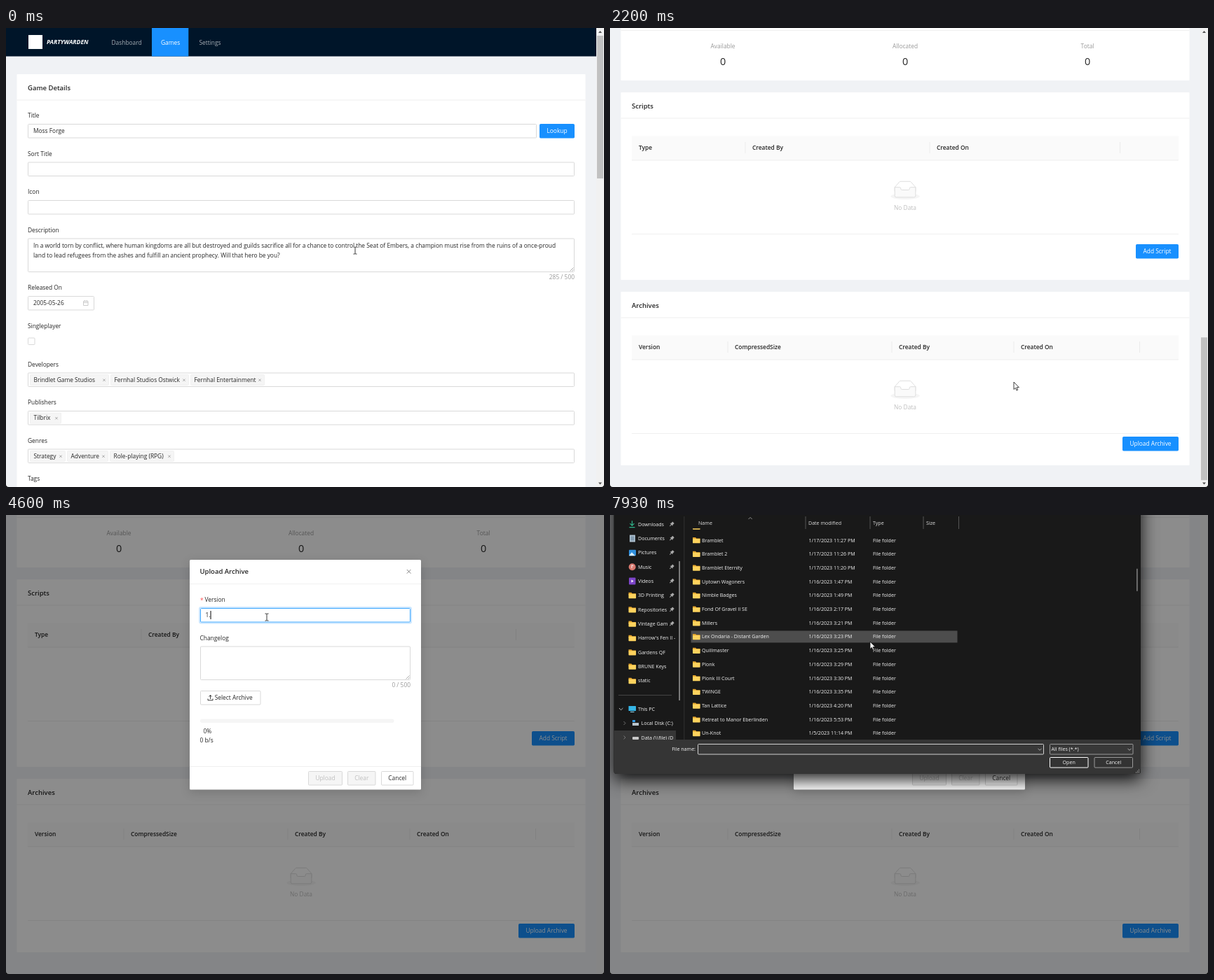
These frames come from a looping animation (853x656 px, 8000 ms). An HTML page:

```html
<!DOCTYPE html>
<html lang="en">
<head>
<meta charset="utf-8">
<title>Upload archive</title>
<style>
  html, body { margin: 0; width: 100%; height: 100%; overflow: hidden; background: #f0f2f5; }
  svg { display: block; width: 853px; height: 656px; }
  text { font-family: "Open Sans", "Noto Sans", sans-serif; white-space: pre; }
  #dialog { filter: drop-shadow(0 8px 12px rgba(0, 0, 0, .9)); }
  #modal { filter: drop-shadow(0 4px 7px rgba(0, 0, 0, .15)); }
</style>
</head>
<body>
<svg id="stage" viewBox="0 0 853 656" xmlns="http://www.w3.org/2000/svg"></svg>
<script>
const BLUE = '#1890ff', INK = '#262626', EDGE = '#d9d9d9', FAINT = '#f0f0f0', PALE = '#bfbfbf';
const LOOP = 8000, PAGE_END = 1388.5, ROW = 19.7, ROW0 = 31.7;

// Markup helpers: text is placed by its vertical centre.
const esc = s => s.replace(/&/g, '&amp;');
const text = (x, y, s, { size = 8.4, fill = INK, weight = 400, anchor = 'start', extra = '' } = {}) =>
  `<text x="${x}" y="${y + size * .36}" font-size="${size}" fill="${fill}" font-weight="${weight}" text-anchor="${anchor}" ${extra}>${esc(s)}</text>`;
const rect = (x, y, w, h, fill, extra = '') =>
  `<rect x="${x}" y="${y}" width="${w}" height="${h}" fill="${fill}" ${extra}/>`;
const line = (d, stroke, width = 1, extra = '') =>
  `<path d="${d}" fill="none" stroke="${stroke}" stroke-width="${width}" ${extra}/>`;
const box = (x, y, w, h, fill = '#fff', stroke = EDGE, extra = '') =>
  rect(x + .5, y + .5, w - 1, h - 1, fill, `stroke="${stroke}" rx="1" ${extra}`);
const bold = { weight: 600 };

function button(x, y, w, label, style = 'primary') {
  const [bg, edge, ink] = {
    primary: [BLUE, BLUE, '#fff'], plain: ['#fff', EDGE, INK], disabled: ['#f5f5f5', EDGE, PALE]
  }[style];
  return box(x, y, w, 20.5, bg, edge) + text(x + w / 2, y + 10.2, label, { fill: ink, anchor: 'middle' });
}

const grip = (x, y) => line(`M${x - 6} ${y - 1}l5-5M${x - 3} ${y - 1}l2-2`, '#888', .7);

function field(y, label, h = 20.5, w = 780) {
  return text(31, y, label) + box(31, y + 12, w, h);
}

function chip(x, y, w, label) {
  const cx = x + w - 7;
  return box(x, y + 14.5, w, 16, '#f5f5f5', FAINT) + text(x + 5.5, y + 22.3, label) +
    line(`M${cx - 1.7} ${y + 21}l3.4 3.4m0-3.4l-3.4 3.4`, '#8c8c8c', .7);
}

function card(y, bottom, title, head = 37) {
  return rect(15.5, y, 811, bottom - y, '#fff', 'rx="1"') +
    text(31, y + head / 2 + .7, title, { size: 9.5, weight: 600 }) +
    rect(15.5, y + head - .5, 811, 1, FAINT);
}

function emptyMark(y) {
  return `<g transform="translate(400.4 ${y}) scale(.645)"><ellipse cx="32" cy="33" rx="32" ry="7" fill="#f5f5f5"/>
    <g stroke="${EDGE}" stroke-width="1.3"><path fill="none" d="M55 12.8L44.9 1.3Q44 0 42.9 0H21.1Q20 0 19.1 1.3L9 12.8V22H55z"/>
    <path fill="#fafafa" d="M41.6 16Q41.6 13 44 13H55V31Q55 35 52 35H12Q9 35 9 31V13H20Q22.4 13 22.4 16T24.6 18.9H39.4Q41.6 18.9 41.6 16z"/></g></g>`;
}

function tableCard(y, bottom, title, columns, lastRule, label, buttonX, buttonY) {
  let out = card(y, bottom, title) + rect(31, y + 62.5, 780, 34.5, '#fafafa') + rect(31, y + 96.5, 780, 1, FAINT);
  columns.forEach(([x, name], i) => {
    out += text(x, y + 79, name, bold);
    if (i) out += rect(x - 10.5, y + 71, 1, 16, '#ebebeb');
  });
  return out + rect(lastRule, y + 71, 1, 16, '#ebebeb') + emptyMark(y + 127.3) +
    text(421, y + 164.6, 'No Data', { fill: PALE, anchor: 'middle' }) +
    rect(31, y + 202, 780, 1, FAINT) + button(buttonX, y + buttonY, 811 - buttonX, label);
}

function page() {
  const dim = '#999';
  let out = rect(0, 0, 842, 2046, '#f0f2f5') + rect(0, 0, 842, 40.5, '#001529') +
    rect(32, 10, 20, 20, '#fff') +
    text(58, 20, 'PARTYWARDEN', { size: 8.6, weight: 700, fill: '#fff', extra: 'font-style="italic"' }) +
    text(150.5, 20.5, 'Dashboard', { fill: '#a6adb4' }) + rect(208, 0, 52.3, 40.5, BLUE) +
    text(221, 20.5, 'Games', { fill: '#fff' }) + text(275.5, 20.5, 'Settings', { fill: '#a6adb4' });

  out += card(66, 764, 'Game Details') +
    field(125, 'Title', 20.5, 726) + text(39, 147, 'Moss Forge') + button(761, 137, 50, 'Lookup') +
    field(179.5, 'Sort Title') + field(234, 'Icon') + field(288.5, 'Description', 48.5) +
    text(39, 311, 'In a world torn by conflict, where human kingdoms are all but destroyed and guilds sacrifice all for a chance to control the Seat of Embers, a champion must rise from the ruins of a once-proud') +
    text(39, 325, 'land to lead refugees from the ashes and fulfill an ancient prophecy. Will that hero be you?') +
    grip(810.5, 348.5) + text(811, 356, '285 / 500', { fill: dim, anchor: 'end' }) +
    field(371, 'Released On', 20.5, 95) + text(39, 393.3, '2005-05-26') +
    line('M110.5 390.5h6.5v6h-6.5zM110.5 392.5h6.5M112.3 389v2M115.2 389v2', PALE, .8) +
    text(31, 426, 'Singleplayer') + box(31, 442.5, 10.5, 10.5) +
    field(480.5, 'Developers') + chip(34, 480.5, 113, 'Brindlet Game Studios') +
    chip(149, 480.5, 112, 'Fernhal Studios Ostwick') + chip(263, 480.5, 106, 'Fernhal Entertainment') +
    field(535, 'Publishers') + chip(34, 535, 45, 'Tilbrix') +
    field(589.5, 'Genres') + chip(34, 589.5, 51, 'Strategy') + chip(87, 589.5, 59, 'Adventure') +
    chip(148, 589.5, 92, 'Role-playing (RPG)') +
    field(644, 'Tags') + button(31, 713, 40, 'Save');

  out += tableCard(781, 1050, 'Actions',
    [[41, 'Name'], [161, 'Path'], [264, 'Arguments'], [439.5, 'Working Dir'], [626.5, 'Primary']], 755.5, 'Add Action', 747, 218);
  out += tableCard(1066.5, 1335, 'Multiplayer Modes',
    [[41, 'Type'], [161, 'MinPlayers'], [357, 'MaxPlayers'], [558, 'Description']], 748.5, 'Add Mode', 749, 217.5);
  out += card(1351.5, 1463.5, 'Keys', 40.5) + button(734, 1361.5, 37, 'Edit', 'plain') + button(771, 1361.5, 40, 'View');
  ['Available', 'Allocated', 'Total'].forEach((name, i) => {
    const x = 161 + 260 * i;
    out += text(x, 1414.5, name, { fill: dim, anchor: 'middle' }) + text(x, 1436.3, '0', { size: 14.4, anchor: 'middle' });
  });
  out += tableCard(1480.5, 1748.5, 'Scripts',
    [[41, 'Type'], [203, 'Created By'], [466, 'Created On']], 727, 'Add Script', 750, 217);
  out += tableCard(1765.5, 2013.5, 'Archives',
    [[41, 'Version'], [178, 'CompressedSize'], [412, 'Created By'], [586, 'Created On']], 755, 'Upload Archive', 731, 207);
  return out;
}

function modal() {
  return rect(262, 64, 330, 328.5, '#fff', 'rx="1.5"') +
    text(276.5, 81, 'Upload Archive', { size: 9.5, weight: 600 }) +
    line('M571.8 78l5.6 5.6m0-5.6l-5.6 5.6', '#777', .9) + rect(262, 98, 330, 1, FAINT) +
    text(277, 122, '*', { fill: '#ff4d4f' }) + text(283.5, 121, 'Version') +
    rect(276, 132, 302, 22.5, 'none', 'id="glow" rx="2" stroke="#1890ff" stroke-opacity=".22" stroke-width="2"') +
    box(277, 133, 300, 20.5, '#fff', EDGE, 'id="version"') +
    text(284.5, 143.2, '', { extra: 'id="typed"' }) + rect(284.5, 137, 1, 12, '#000', 'id="caret"') +
    text(276.5, 175.5, 'Changelog') + box(277, 187.5, 300, 48.5, '#fff', EDGE, 'id="changelog"') + grip(576.5, 235.5) +
    text(577, 243, '0 / 500', { fill: '#999', anchor: 'end' }) +
    rect(277, 251, 86.5, 20.5, 'none', `id="wave" rx="1" stroke="${BLUE}"`) +
    box(277, 251, 86.5, 20.5, '#fff', EDGE, 'id="select"') +
    `<g id="selectInk" fill="${INK}" stroke="${INK}">` +
    '<path fill="none" stroke-width=".9" d="M288 262.5v2.3h7v-2.3M291.5 263v-5.3M289.5 259.5l2-2 2 2"/>' +
    text(297.7, 261.2, 'Select Archive', { fill: 'inherit', extra: 'stroke="none"' }) + '</g>' +
    rect(277, 291.5, 276.5, 5.5, '#f5f5f5', 'rx="2.7"') +
    text(281.5, 309, '0%') + text(276.5, 321.7, '0 b/s') + rect(262, 359, 330, 1, FAINT) +
    button(431, 366, 49, 'Upload', 'disabled') + button(487, 366, 40.5, 'Clear', 'disabled') + button(535, 366, 46.5, 'Cancel', 'plain');
}

const opening = `Tide of Harvests II - Wandering Orchards|1/15/2023 3:50 PM
Plowmeadow 1873|1/15/2023 4:11 PM
Bell of Rust|1/6/2023 2:32 PM
Cartwhistle 2|1/6/2023 2:33 PM
Compass & Kettles|1/15/2023 4:35 PM
Compass & Kettles - Dim Ember|1/15/2023 4:36 PM
Compass & Kettles - Vossarin Noon|1/15/2023 4:37 PM
Compass & Kettles - Vossarin Fog|1/15/2023 4:37 PM
Fence-Whistle 1.6|1/15/2023 4:15 AM
Fence-Whistle Harbor|1/15/2023 11:34 PM
Tamborelo|1/15/2023 11:44 PM
Quibor|1/15/2023 11:49 PM
GritVanz|1/15/2023 11:52 PM
Ossa Ve GOTY|1/15/2023 11:56 PM
PrismoQ 9.0c|1/15/2023 4:18 AM`.split('\n');
const middle = ['Dunmarrow', 'Elm Parade', 'Farthing Lane 2', 'Gable Runners', 'Gorsewick', 'Hollow Teapot', 'Inkpot Valley',
  'Jolly Trellis', 'Kelp Union', 'Kiln Patrol II', 'Larchmoor', 'Ledger Knights', 'Lintel', 'Loam Riders', 'Mallow Barn']
  .map((name, i) => `${name}|1/16/2023 ${1 + i % 11}:${10 + i * 3} AM`);
const closing = `Bramblet|1/17/2023 11:27 PM
Bramblet 2|1/17/2023 11:26 PM
Bramblet Eternity|1/17/2023 11:20 PM
Uptown Wagoners|1/16/2023 1:47 PM
Nimble Badges|1/16/2023 1:49 PM
Fond Of Gravel II SE|1/16/2023 2:17 PM
Millers|1/16/2023 3:21 PM
Lex Ondaria - Distant Garden|1/16/2023 3:23 PM
Quillmaster|1/16/2023 3:25 PM
Plonk|1/16/2023 3:29 PM
Plonk III Court|1/16/2023 3:30 PM
TWINGE|1/16/2023 3:35 PM
Tan Lattice|1/16/2023 4:20 PM
Retreat to Manor Eberlinden|1/16/2023 5:53 PM
Un-Knot|1/5/2023 11:14 PM`.split('\n');

const folder = (x, y) =>
  `<path fill="#e5a52d" d="M${x} ${y - 4}h4l1.3 1.4h5.2v2h-10.5z"/>` + rect(x, y - 2, 10.6, 6.3, '#ffd35e', 'rx=".7"');

function navIcon(i, y) {
  switch (i) {
    case 0: return line(`M31.5 ${y - 5}v7M28.5 ${y - 1}l3 3 3-3M27.5 ${y + 4.5}h8`, '#2fb58c', 1.2);
    case 1: return rect(28, y - 5, 8, 10, '#a9bccb') + line(`M29.5 ${y - 2}h5m-5 2h5m-5 2h5`, '#4b6d88', .8);
    case 2: return rect(27, y - 4, 10, 8.5, '#2f8fdd', 'rx="1"') + `<path fill="#d8efff" d="M27 ${y + 4.5}l4-5 5 5z"/>`;
    case 3: return `<circle cx="31.7" cy="${y}" r="5" fill="#d9796f"/>` + line(`M31 ${y + 2}v-4.5l2.5 1`, '#fff', .9);
    case 4: return rect(27, y - 5, 9.5, 10, '#7d45c9', 'rx="1"') + `<path fill="#fff" d="M30.5 ${y - 2}v4l3.2-2z"/>`;
    default: return folder(26.5, y);
  }
}

function dialog() {
  const light = { size: 7.1, fill: '#f2f2f2' };
  const put = (x, y, s, opts) => text(x, y, s, { ...light, ...opts });
  const chevron = (x, y) => line(`M${x - 2.5} ${y - 1.2}l2.5 2.5 2.5-2.5`, '#ccc', .8);
  let out = rect(5.5, -60, 751.5, 430, '#191919', 'rx="4"') +
    rect(679, -8, 10, 6, '#ddd') + rect(713, -8, 10, 6, '#ddd') + '<circle cx="741" cy="-6.5" r="5" fill="#0a84d8"/>' +
    rect(105.3, 2, 1, 319, '#333');

  const nav = ['Downloads', 'Documents', 'Pictures', 'Music', 'Videos', '3D Printing', 'Repositories', 'Vintage Gam',
    'Harrow\'s Fen II -', 'Gardens QF', 'BRUNE Keys', 'static'];
  nav.forEach((name, i) => {
    const y = 13.2 + i * 20.33;
    out += navIcon(i, y) + put(40, y, name);
    if (i < 8) out += `<path transform="translate(88 ${y}) rotate(45)" fill="#aaa" d="M-1.7-3.5h3.4v3l1 1.3h-2.2v3h-1v-3h-2.2l1-1.3z"/>`;
  });
  out += rect(12, 257, 76, 1, '#444') + rect(98.3, 66, 1.5, 199, '#999') +
    line('M13 276l2.7 2.7 2.7-2.7', '#ccc', .9) + rect(26.5, 273, 10.5, 7, '#35b5e5', 'rx=".6"') + rect(29, 281, 5.5, 1, '#9adcf2') +
    put(40, 277.2, 'This PC') +
    rect(6, 308, 88, 13, '#363636') +
    line('M19.5 295l2.5 2.5-2.5 2.5M19.5 315.5l2.5 2.5-2.5 2.5', '#888', .8) +
    rect(32, 297, 9, 4, '#b9c4cc') + rect(32, 293, 4, 3, '#2f9be8') + put(44.5, 297.5, 'Local Disk (C:)') +
    rect(32, 317, 9, 4, '#c8c8c8', 'rx="1"') + put(44.5, 318, 'Data (\\\\file) (D');

  let rows = '';
  [...opening, ...middle, ...closing, 'Velvet Anvil|1/5/2023 11:16 PM'].forEach((entry, i) => {
    const [name, date] = entry.split('|'), y = ROW0 + i * ROW;
    rows += folder(118, y) + put(131, y, name) + put(283.5, y, date) + put(375, y, 'File folder');
  });
  out += `<clipPath id="listArea"><rect x="106" y="19.2" width="650" height="301.8"/></clipPath>
    <g clip-path="url(#listArea)"><g id="list">${rect(115.5, 0, 380, 17, '#4d4d4d', 'id="hover"')}${rows}</g></g>` +
    rect(751.3, 14, 1.2, 32, '#9f9f9f', 'id="thumb"');
  [[126, 'Name', 279], [283, 'Date modified', 371], [375, 'Type', 447], [451, 'Size', 497.5]].forEach(([x, name, rule]) => {
    out += put(x, 11.5, name, { fill: '#dedede' }) + rect(rule - .5, 2, 1, 18, '#555');
  });
  out += line('M197.5 6l2.6-2.6 2.6 2.6', '#aaa', .8);

  out += '<path fill="#353535" d="M5.5 321h751.5v45q0 4-4 4h-743.5q-4 0-4-4z"/>' +
    put(122, 334.8, 'File name:', { anchor: 'end' }) +
    box(125, 327, 494, 15.5, '#383838', '#d0d0d0') + rect(128, 329.5, .9, 10, '#fff', 'id="nameCaret"') + chevron(613, 335) +
    box(627, 327, 119.5, 15.5, '#383838', '#9a9a9a') + put(629.5, 334.8, 'All files (*.*)') + chevron(741, 335) +
    box(627, 346, 55.5, 15.5, '#333', '#fff') + put(654.7, 353.7, 'Open', { anchor: 'middle' }) +
    box(690.5, 346, 55.5, 15.5, '#333', '#9a9a9a') + put(718.3, 353.7, 'Cancel', { anchor: 'middle' }) +
    line('M750 368h5.5M752 366h3.5M754 364h1.5', '#bbb', 1, 'stroke-dasharray="1 1"');
  return out;
}

const beam = 'M-2.5-5h2l.5.6.5-.6h2M0-4.5v9M-2.5 5h2l.5-.6.5.6h2';
const pointers = `
  <g id="beam">${line(beam, '#fff', 2)}${line(beam, '#222', .9)}</g>
  <path id="arrow" fill="#fff" stroke="#111" stroke-width=".8" d="M0 0v10.5l2.4-2.2 1.6 3.7 1.7-.8-1.6-3.5h3.3z"/>
  <path id="hand" fill="#fff" stroke="#111" stroke-width=".8" stroke-linejoin="round" d="M-1.2 1q1.2-2 2.4 0v3.5q1-.6 2 .3 1.1-.5 1.9.4 1.3-.2 1.5 1v3.3q0 2-1.2 3.8h-5q-1.5-2.5-3.5-4.8-.6-1.5 1-1.2l.9.9z"/>`;

const stage = document.getElementById('stage');
stage.innerHTML = `<g id="page">${page()}</g>` +
  rect(842, 0, 11, 656, '#f1f1f1') +
  `<g id="scrollbar">${rect(843, 0, 9, 204, '#c1c1c1', 'id="pageThumb"')}
    <path fill="#505050" d="M845 7l2.5-3 2.5 3zM845 649.5l2.5 3 2.5-3z"/></g>` +
  '<path fill="#000" d="M0 652q0 4 4 4h-4zM853 652q0 4-4 4h4z"/>' +
  rect(0, 0, 853, 656, '#000', 'id="mask"') +
  `<g id="modal">${modal()}</g><g id="dialog">${dialog()}</g><g id="pointer">${pointers}</g>`;

const parts = Object.fromEntries([...stage.querySelectorAll('[id]')].map(node => [node.id, node]));
const set = (id, attrs) => { for (const key in attrs) parts[id].setAttribute(key, attrs[key]); };
const show = (id, on) => set(id, { display: on ? 'inline' : 'none' });

const clamp = v => Math.min(1, Math.max(0, v));
const progress = (t, from, span) => clamp((t - from) / span);
const smooth = p => p * p * (3 - 2 * p);
const easeOut = p => 1 - (1 - p) ** 3;

// Interpolates [time, ...values] keys.
function along(keys, t, ease = p => p) {
  const n = keys.findIndex(key => key[0] > t);
  if (n === 0) return keys[0].slice(1);
  if (n < 0) return keys[keys.length - 1].slice(1);
  const a = keys[n - 1], b = keys[n], p = ease((t - a[0]) / (b[0] - a[0]));
  return a.slice(1).map((v, i) => v + (b[i + 1] - v) * p);
}
// Latest value whose time has come.
const held = (keys, t) => keys.filter(key => key[0] <= t).pop()[1];

const mix = (from, to, p) => 'rgb(' + from.map((v, i) => Math.round(v + (to[i] - v) * p)) + ')';
const edgeTint = p => mix([217, 217, 217], [64, 169, 255], p);

const scrollKeys = [[600, 0], [730, 90], [1200, 780], [1600, 1290], [1930, PAGE_END]];
const pointerKeys = [[2000, 498, 318], [2200, 576, 506], [2470, 768, 594], [2730, 768, 594], [3270, 389, 224], [3600, 372, 146],
  [5530, 372, 146], [6070, 348, 259], [6400, 346, 269], [7130, 346, 269], [7330, 371, 181]];
const pointerKinds = [[0, 'beam'], [2070, 'arrow'], [2400, 'hand'], [2870, 'arrow'], [3200, 'beam'], [3430, 'arrow'], [3540, 'beam'],
  [5700, 'arrow'], [5800, 'beam'], [5960, 'arrow'], [6000, 'hand'], [6930, 'arrow']];
const typing = [[0, ''], [4470, '1'], [4600, '1.'], [4730, '1.0'], [5000, '1.0.'], [5130, '1.0.0']];
const listKeys = [[0, 0], [7400, 4.78], [7470, 10.78], [7530, 16.78], [7600, 22.78], [7670, 26.78], [7930, 29.78]];
const changelogKeys = [[3200, 0], [3270, .25], [3430, .8], [3700, 0], [5800, 0], [6000, 1], [6070, .85], [6270, 0]];

function draw(t) {
  const [scroll] = along(scrollKeys, t);
  set('page', { transform: `translate(0 ${-scroll})` });
  set('pageThumb', { y: 11 + scroll / 3.22 });

  const opened = progress(t, 2640, 300), zoom = .2 + .8 * easeOut(opened);
  show('scrollbar', opened === 0);
  set('mask', { opacity: .45 * opened });
  show('modal', opened > 0);
  set('modal', { opacity: opened, transform: `translate(${768 * (1 - zoom)} ${594 * (1 - zoom)}) scale(${zoom})` });

  const focus = progress(t, 3740, 200);
  set('version', { stroke: edgeTint(Math.max(focus, progress(t, 3540, 200))) });
  set('glow', { opacity: focus });
  set('changelog', { stroke: edgeTint(along(changelogKeys, t)[0]) });
  const typed = held(typing, t);
  parts.typed.textContent = typed;
  const blinkStart = t < 4470 ? 3800 : Math.max(...typing.map(key => key[0]).filter(time => time <= t));
  show('caret', t >= 3800 && t < 6530 && (t - blinkStart) % 1060 < 530);
  set('caret', { x: 284.5 + (typed ? parts.typed.getComputedTextLength() : 0) });

  const over = progress(t, 6070, 250), pressed = progress(t, 6470, 400), spread = 5 * easeOut(pressed);
  set('select', { stroke: edgeTint(over) });
  const ink = mix([38, 38, 38], [64, 169, 255], over);
  set('selectInk', { fill: ink, stroke: ink });
  set('wave', { 'stroke-width': 2 * spread, 'stroke-opacity': .25 * (1 - pressed) });

  const [x, y] = along(pointerKeys, t, smooth), kind = held(pointerKinds, t);
  set('pointer', { transform: `translate(${x} ${y})` });
  for (const name of ['beam', 'arrow', 'hand']) show(name, name === kind);

  const grow = 1 - .16 * (1 - easeOut(progress(t, 6860, 300)));
  show('dialog', t >= 6860);
  set('dialog', {
    opacity: progress(t, 6850, 110),
    transform: `translate(${364 * (1 - grow)} ${124 * (1 - grow)}) scale(${grow})`
  });
  const offset = held(listKeys, t) * ROW;
  const pointerY = (y - 124 * (1 - grow)) / grow;
  const hovered = Math.round((pointerY - ROW0 + offset) / ROW);
  set('list', { transform: `translate(0 ${-offset})` });
  set('hover', { y: ROW0 + hovered * ROW - 8.5 });
  set('thumb', { y: 14 + offset * .107 });
  show('nameCaret', (t - 6930) % 1060 < 530);
}

// Motion advances fifteen times a second.
const start = performance.now();
function tick() {
  const t = (performance.now() - start) % LOOP;
  draw(Math.round(Math.floor((t + 5) * .015) * 20 / 3) * 10);
  requestAnimationFrame(tick);
}
tick();
</script>
</body>
</html>
```
